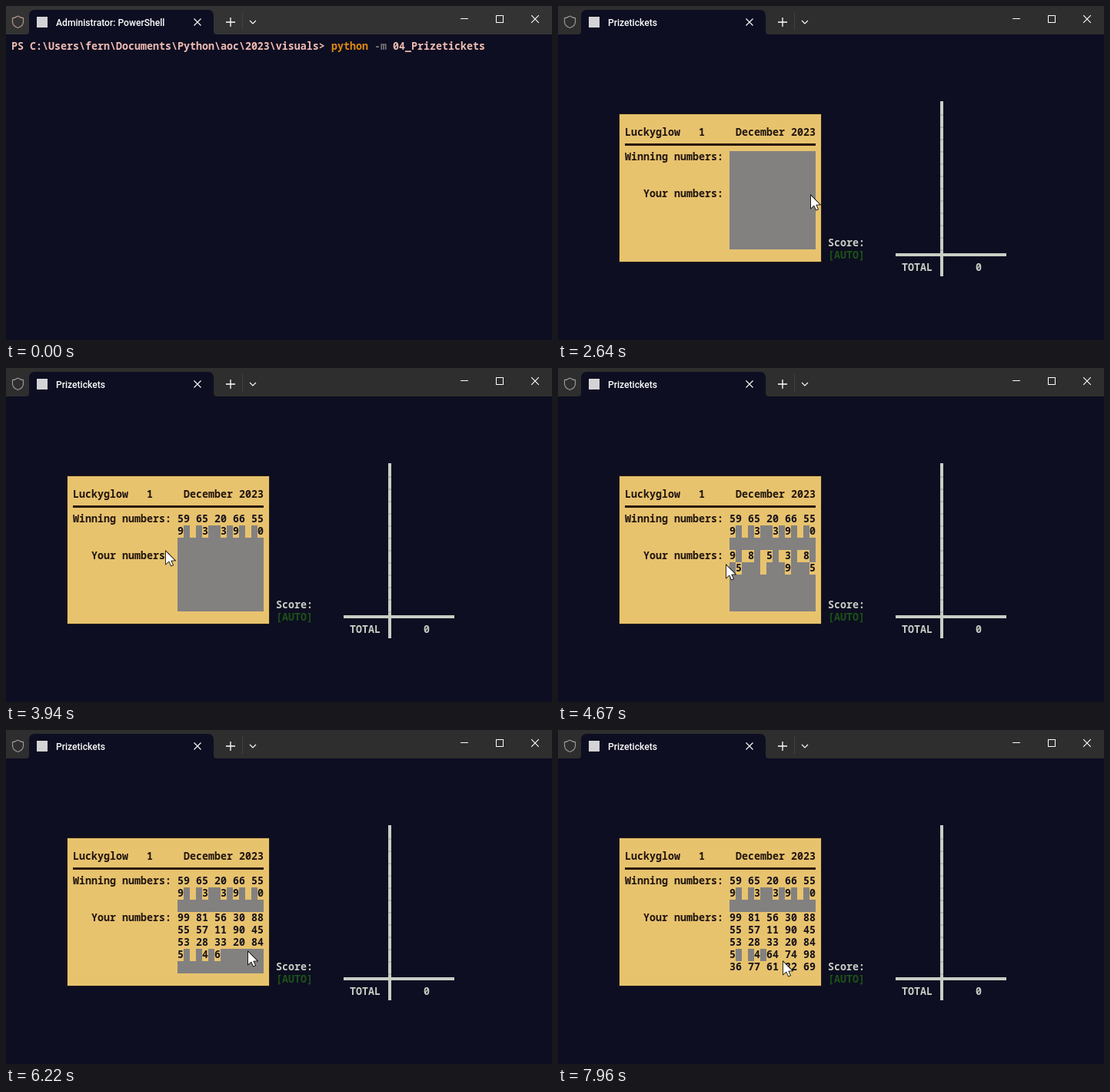
An HTML page with a canvas that plays this animation: 710 px wide and 435 px high, repeating every 7.99 s.

```html
<!DOCTYPE html>
<html lang="en">
<head>
<meta charset="utf-8">
<title>Scratch ticket terminal</title>
<style>
html, body { margin: 0; width: 100%; height: 100%; overflow: hidden; background: #0d0e21; }
canvas { display: block; }
</style>
</head>
<body>
<canvas id="stage" width="710" height="435"></canvas>
<script>
const ctx = document.getElementById('stage').getContext('2d');
const LOOP = 7990;
const START = 1930;   // the ticket screen replaces the prompt
const TICK = 15;      // the ticket samples the pointer this often
const LAG = 32;       // and shows the scratched cell this much later
const MONO = '600 13.333px "Noto Sans Mono", "DejaVu Sans Mono", monospace';
const UI = '500 12.1px Roboto, "Open Sans", sans-serif';
const BG = '#0d0e21', PINK = '#f0bcb2', INK = '#21150f', PALE = '#c9cdc4';

const colX = c => 7 + 8 * c;
const rowY = r => 45 + 16 * r;

// Hidden field: 14 columns wide, first cell at column 27, row 9
const LEFT = 27, TOP = 9;
const field = [
  '59 65 20 66 55',
  '9  43 83 91 70',
  '              ',
  '99 81 56 30 88',
  '55 57 11 90 45',
  '53 28 33 20 84',
  '51 24 64 74 98',
  '36 77 61 82 69'
].map(line => [...line].map(char => ({ char, at: Infinity })));

// Strokes along one field row; fast ones skip cells
const stroke = (start, end, row, from, to) => ({ start, end, row, from, to });
const strokes = [
  stroke(2900, 3110, 0, 13, 0),
  stroke(3540, 3630, 1, 13, 0),
  stroke(3970, 4150, 3, 0, 18),
  stroke(4310, 4355, 4, 13, 1),
  stroke(4690, 4825, 4, 0, 9),
  stroke(4900, 5140, 3, 14, 0),
  stroke(5480, 5540, 4, 10, 13),
  stroke(5620, 5850, 5, 13, 0),
  stroke(6135, 6225, 6, 0, 12),
  stroke(6300, 6430, 6, 13, 6),
  stroke(6520, 6740, 7, 6, 0),
  stroke(6910, 7200, 7, 0, 14)
];

for (const { start, end, row, from, to } of strokes) {
  for (let t = start; t <= end; t += TICK) {
    const col = Math.round(from + (to - from) * (t - start) / (end - start));
    const cell = field[row][col];
    if (cell) cell.at = Math.min(cell.at, t + LAG);
  }
}

// Pointer tip: a few resting points joined with the stroke ends
const point = (t, x, y) => ({ t, x, y });
const onField = (t, col, row) => point(t, colX(LEFT + col), rowY(TOP + row) + 4);
const path = [
  point(30, 640, 432), point(280, 577, 338), point(690, 577, 338), point(720, 577, 331),
  point(1900, 577, 331), point(2640, 329, 247), point(2800, 388, 206), point(3440, 388, 205),
  point(3840, 132, 219), point(3940, 207, 239), point(4520, 187, 254),
  point(5210, 217, 247), point(5370, 217, 247), point(7700, 223, 307), point(7960, 293, 302),
  ...strokes.flatMap(s => [onField(s.start, s.from, s.row), onField(s.end, s.to, s.row)])
].sort((a, b) => a.t - b.t);

function pointer(t) {
  const i = path.findIndex(p => p.t > t);
  if (i < 0) return path[path.length - 1];
  const a = path[Math.max(0, i - 1)], b = path[i];
  const k = (t - a.t) / (b.t - a.t || 1);
  return point(t, Math.round(a.x + (b.x - a.x) * k), Math.round(a.y + (b.y - a.y) * k));
}

function box(x, y, w, h, color) {
  ctx.fillStyle = color;
  ctx.fillRect(x, y, w, h);
}

function text(str, col, row, color) {
  ctx.font = MONO;
  ctx.fillStyle = color;
  ctx.fillText(str, colX(col), rowY(row) + 12);
}

function lines(color, width, ...polys) {
  ctx.strokeStyle = color;
  ctx.lineWidth = width;
  ctx.beginPath();
  for (const poly of polys) poly.forEach(([x, y], i) => i ? ctx.lineTo(x, y) : ctx.moveTo(x, y));
  ctx.stroke();
}

function cross(x, y, r) {
  lines('#fff', 1.1, [[x - r, y - r], [x + r, y + r]], [[x + r, y - r], [x - r, y + r]]);
}

function shield(color) {
  ctx.save();
  ctx.translate(15.5, 13);
  ctx.strokeStyle = color;
  ctx.lineWidth = 1.2;
  ctx.beginPath();
  for (const side of [-7, 7]) {
    ctx.moveTo(0, 0);
    ctx.quadraticCurveTo(side / 2, 2.5, side, 2.7);
    ctx.lineTo(side, 7.5);
    ctx.quadraticCurveTo(side, 13, 0, 15.5);
  }
  ctx.stroke();
  ctx.restore();
}

function tab(x, y, w, bottom) {
  ctx.fillStyle = BG;
  ctx.beginPath();
  ctx.moveTo(x - 4, bottom);
  ctx.arcTo(x, bottom, x, y, 4);
  ctx.arcTo(x, y, x + w, y, 7);
  ctx.arcTo(x + w, y, x + w, bottom, 7);
  ctx.arcTo(x + w, bottom, x + w + 4, bottom, 4);
  ctx.lineTo(x + w + 4, bottom);
  ctx.fill();
}

function titleBar(t) {
  box(0, 0, 710, 37, t < 30 ? '#333333' : '#2e2e2e');
  shield(t < 30 ? '#b3948c' : '#969696');
  tab(30, 5, 240, 37);
  box(40, 14, 14, 14, '#d4d4d6');
  ctx.font = UI;
  ctx.fillStyle = '#fff';
  ctx.fillText(t < START ? 'Administrator: PowerShell' : 'Prizetickets', 65, 26);
  cross(249, 21, 4.5);
  lines('#fff', 1.3, [[286, 21], [298, 21]], [[292, 15], [292, 27]]);
  lines('#414141', 1, [[307.5, 8], [307.5, 31]]);
  lines('#fff', 1.1, [[317, 19], [321, 23], [325, 19]]);
  box(591, 16, 10, 1, '#fff');
  ctx.lineWidth = 1;
  ctx.strokeRect(637.5, 12.5, 9, 9);
  cross(688, 17, 4.8);
}

function prompt(t) {
  text('PS C:\\Users\\fern\\Documents\\Python\\aoc\\2023\\visuals>', 0, 0, PINK);
  text('python', 52, 0, '#e08a10');
  text('-m', 59, 0, '#777476');
  text('04_Prizetickets', 62, 0, PINK);
  if (t >= 280 && t < 690) box(623, 45, 1, 16, '#fff');
  if (t >= 720 && t < 1360) box(7, 61, 1, 16, '#fff');
}

function ticket(t) {
  box(79, 140, 264, 194, '#2b2018');
  box(80, 141, 262, 192, '#e8c36e');
  text('Luckyglow', 10, 7, INK);
  text('1', 22, 7, INK);
  text('December 2023', 28, 7, INK);
  box(87, 179, 248, 3, '#2a160f');
  text('Winning numbers:', 10, 9, INK);
  text('Your numbers:', 13, 12, INK);
  field.forEach((cells, r) => cells.forEach(({ char, at }, c) => {
    if (t >= at) text(char, LEFT + c, TOP + r, '#17131c');
    else box(colX(LEFT + c), rowY(TOP + r), 8, 16, '#828180');
  }));
}

function scoreboard() {
  text('Score:', 43, 16, PALE);
  text('[AUTO]', 43, 17, '#1d5218');
  box(497, 124, 4, 228, PALE);
  for (let y = 141; y < 320; y += 16) box(497, y, 4, 2, '#b1b6b0');
  box(439, 322, 144, 4, PALE);
  text('TOTAL', 55, 18, PALE);
  text('0', 67, 18, PALE);
}

function arrow({ x, y }) {
  const shape = [[0, 0], [0, 16], [4, 12.5], [6.8, 18.5], [9, 17.5], [6.3, 11.7], [11.5, 11.5]];
  ctx.beginPath();
  shape.forEach(([dx, dy]) => ctx.lineTo(x + dx, y + dy));
  ctx.closePath();
  ctx.strokeStyle = '#000';
  ctx.lineWidth = 1.6;
  ctx.stroke();
  ctx.fillStyle = '#fff';
  ctx.fill();
}

function draw(t) {
  box(0, 0, 710, 435, BG);
  titleBar(t);
  if (t < START) {
    prompt(t);
  } else {
    ticket(t);
    scoreboard();
  }
  if (t >= 30) arrow(pointer(t));
}

function tick() {
  draw(performance.now() % LOOP);
  requestAnimationFrame(tick);
}
tick();
</script>
</body>
</html>
```
